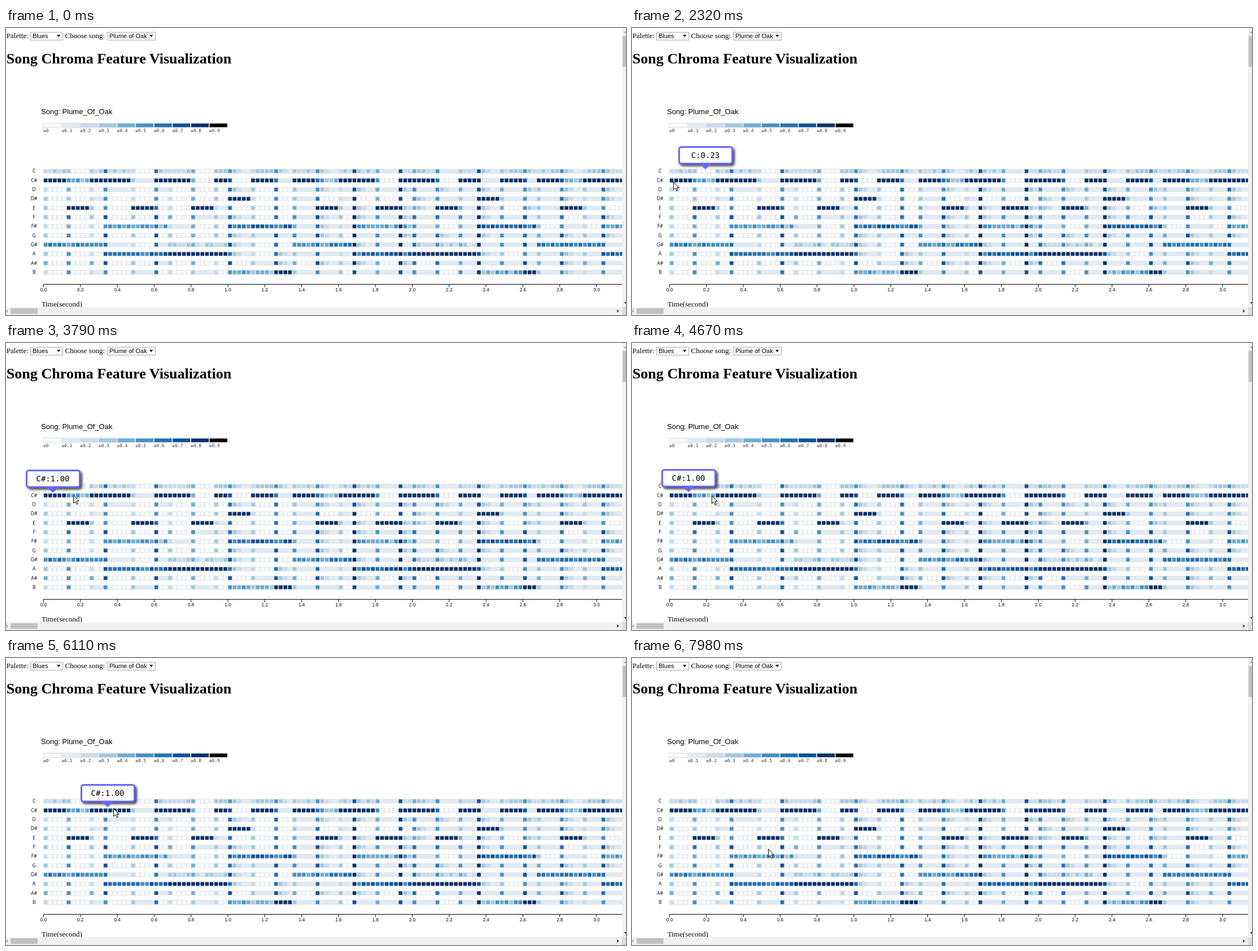
Write an HTML page that moves like this. It is 1098 px wide and 510 px high and loops after 8 s.

```html
<!DOCTYPE html>
<html lang="en">
<head>
<meta charset="utf-8">
<title>Song Chroma Feature Visualization</title>
<style>
  html, body { margin: 0; width: 100%; height: 100%; overflow: hidden; background: #fff; }
  svg { display: block; width: 1098px; height: 510px; }
  .serif { font: 13px "Liberation Serif", serif; }
  .title { font: bold 26.1px "Liberation Serif", serif; }
  .sans { font: 13px "Liberation Sans", sans-serif; }
  .menu { font: 11px "Liberation Sans", sans-serif; }
  .tick { font: 8.2px "Liberation Sans", sans-serif; text-anchor: middle; }
  .note { font: 8.5px "Open Sans", sans-serif; text-anchor: middle; }
  .legend { font: 7.8px "DejaVu Sans Mono", monospace; fill: #333; }
  .value { font: 14px "DejaVu Sans Mono", monospace; text-anchor: middle; }
  .bubble { fill: #fff; stroke: #6666ff; stroke-width: 3; filter: drop-shadow(3.5px 3.5px 2px #444); }
</style>
</head>
<body>
<svg id="stage" viewBox="0 0 1098 510"></svg>
<script>
const stage = document.getElementById('stage');
const palette = ['#f7fbff', '#deebf7', '#c6dbef', '#9ecae1', '#6baed6',
                 '#4292c6', '#2171b5', '#08519c', '#08306b', '#000'];
const notes = ['C', 'C#', 'D', 'D#', 'E', 'F', 'F#', 'G', 'G#', 'A', 'A#', 'B'];
const PITCH = 8.163, COLUMNS = 126;

function add(tag, attrs, text = '', parent = stage) {
  const el = document.createElementNS('http://www.w3.org/2000/svg', tag);
  for (const key in attrs) el.setAttribute(key, attrs[key]);
  el.textContent = text;
  return parent.appendChild(el);
}
const rect = (x, y, width, height, fill, more) => add('rect', { x, y, width, height, fill, ...more });
const path = (d, fill, more) => add('path', { d, fill, ...more });
const label = (x, y, cls, text) => add('text', { x, y, class: cls }, text);

function noise(a, b) {
  const s = Math.sin(a * 12.9898 + b * 78.233 + 4) * 43758.5453;
  return s - Math.floor(s);
}

// The music: bars of 16 steps with six pulses, a two-bar riff, a chord per half bar
const STEP_COLUMNS = 1.672;
const pulses = [0, 3, 6, 8, 11, 14];
const power = [3, 5, 3, 7, 3, 7];
const riff = 'C# E C# C# E C# C# E C# D# C# B'.split(' ');
const chords = [{ 'C#': 4, 'G#': 5 }, { 'F#': 4, 'A': 6 }, { 'A': 8, 'G#': 2 }, { 'F#': 6, 'B': 4 }];

function level(row, col) {
  const step = (col + .38) / STEP_COLUMNS, bar = Math.floor(step / 16);
  const pulse = pulses.findLastIndex(p => p < step % 16);
  const beat = bar * 6 + pulse, note = notes[row], n = noise(row + 1, col + 1);
  const age = Math.floor((step % 16 - pulses[pulse]) * STEP_COLUMNS);
  const sung = riff[beat % 12];
  if (note === sung) return 8;

  let shade = noise(row + 3, beat) < (bar < 2 ? .25 : .8) && col > 4 ? 1 : 0;
  const chord = chords[Math.floor(step / 8) % 4][note];
  if (chord) shade = chord + (chord < 8 ? Math.round((n - .4) * 2) : 0);
  if (note === 'C' && sung === 'C#') shade = n > .6 ? 3 : 2;

  const strength = power[pulse] + (bar > 1 ? Math.round(noise(beat, 2) * 3) : 0);
  const hit = strength * (.72 + .28 * noise(row, 9)) + (n - .5) * 1.5;
  const echo = bar > 0 && strength > 5 && noise(row + 5, beat) > .5 ? 4 / (age + .4) : 0;
  return Math.min(8, Math.max(shade, Math.round(age ? echo : hit)));
}

function dropdown(x, width, text) {
  rect(x + .5, 7.5, width, 14, '#fff', { stroke: '#a9a9a9' });
  label(x + 4, 18, 'menu', text);
  path(`M${x + width - 10} 12h6.4l-3.2 4.6z`, '#222');
}

function drawPage() {
  label(.8, 18, 'serif', 'Palette:');
  dropdown(43, 57, 'Blues');
  label(104.6, 18, 'serif', 'Choose song:');
  dropdown(179, 85, 'Plume of Oak');
  label(.8, 63, 'title', 'Song Chroma Feature Visualization');
  label(62, 152.5, 'sans', 'Song: Plume_Of_Oak');

  palette.forEach((color, i) => {
    const x = 66 + 32.65 * i;
    rect(x, 169, 32.65, 8, color, { stroke: '#e6e6e6', 'stroke-width': 1.6 });
    label(x, 185, 'legend', i ? '≥0.' + i : '≥0');
  });

  notes.forEach((note, row) => {
    const y = 250.2 + row * PITCH * 2;
    label(49.7, y + 7.2, 'note', note);
    rect(66, y, 1025, 8.6, '#e6e6e6', { rx: 1.5 });
    for (let col = 0; col < COLUMNS; col++)
      rect(66.9 + col * PITCH, y + 1, 6.5, 6.6, palette[level(row, col)], { rx: .8 });
  });

  path('M66.5 460.5V455.5H1091', 'none', { stroke: '#000' });
  for (let i = 0; i < 16; i++) {
    const x = 66.5 + 65.3 * i;
    path(`M${x} 455v5.5`, 'none', { stroke: '#000' });
    label(x, 467.5, 'tick', (i * .2).toFixed(1));
  }
  label(63, 495, 'serif', 'Time(second)');

  rect(1091, 0, 7, 496, '#f1f1f1');
  rect(1092, 14, 6, 55, '#c1c1c1');
  path('M1094 9l4-4v4z', '#a3a3a3');
  path('M1094 487h4v4z', '#505050');
  rect(0, 496, 1091, 14, '#f1f1f1');
  rect(1091, 496, 7, 14, '#dcdcdc');
  rect(8, 498, 48, 10, '#c1c1c1');
  path('M3 500v6l-3-3z', '#a3a3a3');
  path('M1082 500v6l4-3z', '#505050');
}

// Key points: time, x, y
const pointerRoute = [[140, 885, 460], [370, 108, 175], [680, 108, 175], [980, 95, 38],
  [1380, 95, 38], [1990, 135, 245], [2320, 73, 273], [3100, 75, 271], [3270, 82, 271],
  [4030, 143, 270], [4670, 141, 271], [5570, 178, 271], [6110, 190, 267], [7210, 190, 266],
  [7980, 241, 339]];
const tipRoute = [[1940, 112, 212], [2090, 82, 210], [2340, 82, 210], [2410, 46, 225], [2640, 21, 225],
  [3270, 21, 225], [4260, 52, 224], [4740, 52, 224], [5260, 100, 226], [5570, 112, 226],
  [6110, 132, 224]];
const TIP_END = 7290, FRAME = 77;

function along(route, t) {
  const i = route.findLastIndex(key => key[0] <= t);
  const [t0, x0, y0] = route[i], [t1, x1, y1] = route[i + 1] || [Infinity, x0, y0];
  const k = Math.floor((t - t0 + 2) / FRAME) * FRAME / (t1 - t0);
  return [x0 + (x1 - x0) * k, y0 + (y1 - y0) * k].map(Math.round);
}

drawPage();
const tip = add('g', {});
add('rect', { x: 1.5, y: 1.5, width: 94, height: 29.5, rx: 4, class: 'bubble' }, '', tip);
add('path', { d: 'M37.5 31.5h21l-10.5 9.5z', fill: '#6666ff' }, '', tip);
const value = add('text', { x: 48, y: 21, class: 'value' }, '', tip);
const pointer = path('M.5 .5V14.5L3.7 11.5 6 16.7 8.2 15.7 6 10.7H10.3Z', '#fff', { stroke: '#000' });

function follow(el, route, t, end) {
  const shown = t >= route[0][0] && t < end;
  el.style.display = shown ? '' : 'none';
  if (!shown) return;
  const [x, y] = along(route, t);
  el.setAttribute('transform', `translate(${x} ${y})`);
  return x;
}

function draw(t) {
  follow(pointer, pointerRoute, t, 8000);
  const left = follow(tip, tipRoute, t, TIP_END);
  if (left === undefined) return;
  const col = Math.max(0, Math.round((left - 22) / PITCH));
  value.textContent = t < 2410 ? 'C:0.23' : level(1, col) > 7 ? 'C#:1.00' : 'C#:0.46';
}

function loop() {
  draw(performance.now() % 8000);
  requestAnimationFrame(loop);
}
loop();
</script>
</body>
</html>
```
